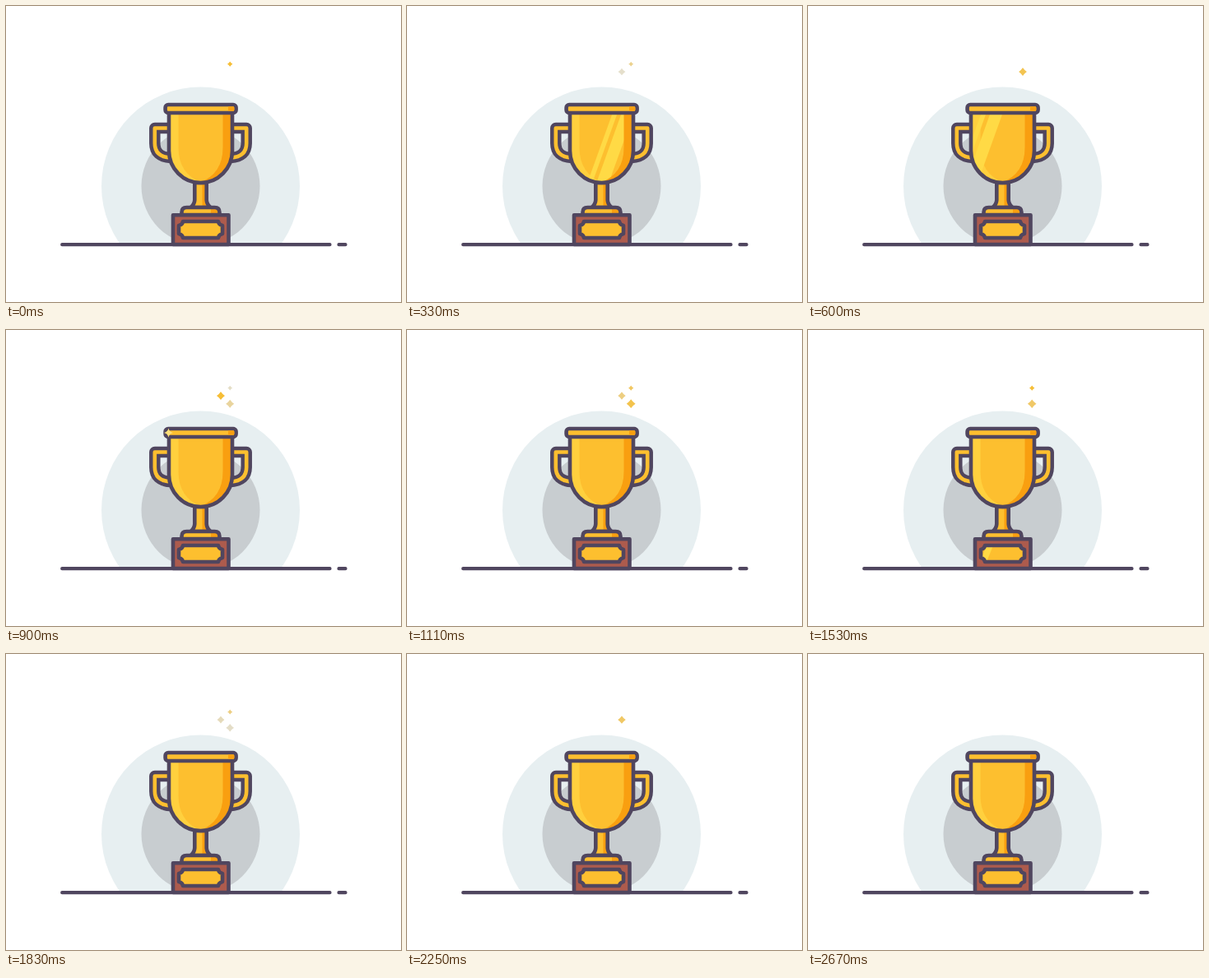
An HTML page that plays this animation: 480 px wide and 360 px high, repeating every 2.7 s.

```html
<!DOCTYPE html>
<html>
<head>
<meta charset="utf-8">
<title>Trophy</title>
<style>
html, body { margin: 0; width: 100%; height: 100%; overflow: hidden; background: #fff; }
svg { display: block; width: 100vw; height: 100vh; }
.line { stroke: #50465f; stroke-width: 4.6; stroke-linecap: round; stroke-linejoin: round; }
.gold { fill: #fdbf2f; }
.shade { fill: #f99f10; }
.light { fill: #ffd03e; }
.shine { fill: #ffda45; }
.none { fill: none; }
</style>
</head>
<body>
<svg viewBox="0 0 480 360">
  <defs>
    <path id="bowl" d="M198 129V176A38.5 39 0 0 0 275 176V129Z"/>
    <path id="stem" d="M229.300 215V236Q229 241 224.500 245H248.500Q244 241 243.700 236V215Z"/>
    <path id="foot" d="M213.500 254V251Q213.500 245 219.500 245H253.500Q259.500 245 259.500 251V254Z"/>
    <path id="plate" d="M215 262H258Q258.500 266 263 267V277Q258.500 278 258 282H215Q214.500 278 210 277V267Q214.500 266 215 262Z"/>
    <path id="handle" d="M200 148.500H180.800V167Q180.800 183.500 200 184.500"/>
    <g id="pair">
      <use href="#handle" class="none" stroke="#50465f" stroke-width="13.500" stroke-linejoin="round"/>
      <use href="#handle" class="none" stroke="#fdbf2f" stroke-width="4.600" stroke-linejoin="round"/>
    </g>
    <clipPath id="inBowl"><use href="#bowl"/></clipPath>
    <clipPath id="inPlate"><use href="#plate"/></clipPath>
    <clipPath id="aboveGround"><path d="M0 0H480V290H0Z"/></clipPath>
  </defs>

  <g clip-path="url(#aboveGround)">
    <circle cx="236.500" cy="219" r="120.500" fill="#e7eff1"/>
    <circle cx="236.500" cy="219" r="72" fill="#c8cdd0"/>
  </g>

  <use href="#pair"/>
  <use href="#pair" transform="matrix(-1 0 0 1 473 0)"/>

  <use href="#stem" class="gold"/>
  <path class="shade" d="M238.500 215H243V243H238.500Z"/>
  <use href="#stem" class="line none"/>
  <use href="#foot" class="gold"/>
  <path class="shade" d="M249 246H255L259 250V253H249Z"/>
  <use href="#foot" class="line none"/>

  <use href="#bowl" class="gold"/>
  <g clip-path="url(#inBowl)">
    <path class="light" d="M198 129H209.500V172Q209.500 206 241 216H198Z"/>
    <g id="bowlShine" class="shine">
      <path d="M0 130H6L-25 216H-31Z"/>
      <path d="M11 130H26L-5 216H-20Z"/>
    </g>
    <path class="shade" d="M263.500 129H276V216H232Q263.500 206 263.500 172Z"/>
  </g>
  <use href="#bowl" class="line none"/>

  <rect x="193.600" y="120" width="86" height="10" rx="3.500" class="line gold"/>
  <path class="shade" d="M270 122.300H276.500Q277.500 122.300 277.500 125T276.500 127.700H270Z"/>
  <path id="glint" fill="#ffe07a" d="M0 -5.500Q1 -1 5.500 0Q1 1 0 5.500Q-1 1 -5.500 0Q-1 -1 0 -5.500Z"/>

  <path d="M203 254.300H270.500V290H203Z" class="line" fill="#ad5b4d"/>
  <use href="#plate" class="gold"/>
  <g clip-path="url(#inPlate)">
    <g id="plateShine" class="shine">
      <path d="M-5 262H-2L-10 282H-13Z"/>
      <path d="M2 262H10L2 282H-6Z"/>
    </g>
  </g>
  <use href="#plate" class="line none"/>

  <path class="line none" style="stroke-width:4.200" d="M68.200 290.200H393.500M404.500 290.200H412.500"/>
  <g id="sparks"></g>
</svg>
<script>
const LOOP = 2700;
const SPEED = 0.145;
const byId = id => document.getElementById(id);

// Each spark lists [time, strength] keys
const sparks = [
  { x: 272.2, y: 70.6, r: 3.2, keys: [[0, 1], [180, 1], [480, 0], [840, 0], [1200, 1], [1620, 1], [2100, 0]] },
  { x: 261, y: 80, r: 5, keys: [[270, 0], [660, 1], [930, 1], [1350, 0], [1740, 0], [2130, 1], [2580, 0]] },
  { x: 272.2, y: 89.7, r: 5.5, keys: [[720, 0], [1170, 1], [1380, 1], [1920, 0]] }
];

for (const s of sparks) {
  s.node = document.createElementNS("http://www.w3.org/2000/svg", "path");
  s.node.setAttribute("d", "M0 -1Q.4 -.4 1 0Q.4 .4 0 1Q-.4 .4 -1 0Q-.4 -.4 0 -1Z");
  byId("sparks").append(s.node);
}

function sample(keys, t) {
  const i = keys.findIndex(k => k[0] > t);
  if (i < 0) return keys[keys.length - 1][1];
  if (i === 0) return keys[0][1];
  const [t0, a] = keys[i - 1], [t1, b] = keys[i];
  return a + (b - a) * (t - t0) / (t1 - t0);
}

function mix(k) {
  const from = [224, 227, 226], to = [246, 190, 55];
  return `rgb(${from.map((c, i) => Math.round(c + (to[i] - c) * k))})`;
}

function slide(id, x, dt) {
  byId(id).setAttribute("transform", `translate(${x - dt * SPEED})`);
}

function draw(now) {
  const t = now % LOOP;
  slide("bowlShine", 250, t - 330);
  slide("plateShine", 250, t - 1290);
  const glint = Math.max(0, 1 - Math.abs(t - 900) / 150);
  byId("glint").setAttribute("transform", `translate(197.5 125) scale(${glint})`);
  for (const s of sparks) {
    const k = sample(s.keys, t);
    s.node.setAttribute("transform", `translate(${s.x} ${s.y}) scale(${s.r * (0.85 + 0.15 * k)})`);
    s.node.setAttribute("fill", mix(k));
    s.node.setAttribute("opacity", Math.min(1, k * 6));
  }
  requestAnimationFrame(draw);
}
requestAnimationFrame(draw);
</script>
</body>
</html>
```
